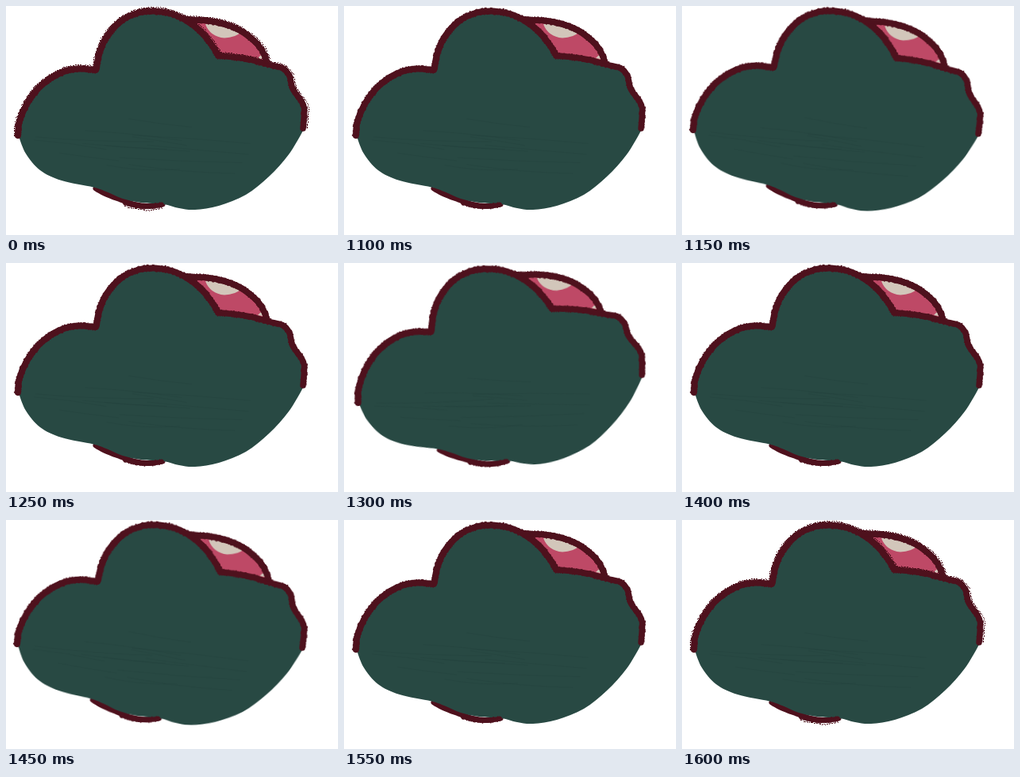
An HTML page for the animation above (2400 ms loop, 418 px wide and 290 px high).

```html
<!DOCTYPE html>
<html lang="en">
<head>
<meta charset="utf-8">
<title>Wobbling cloud</title>
<style>
  html, body { margin: 0; width: 100%; height: 100%; overflow: hidden; background: #fff; }
  svg { display: block; width: 418px; height: 290px; }
  #cloud { transform-origin: 195px 133px; }
  .ink { fill: none; stroke: #4e111d; stroke-linecap: round; stroke-linejoin: round; }
  .grain { fill: #4e111d; }
  .streak { fill: none; stroke: #223f39; stroke-width: 1; opacity: .28; }
</style>
</head>
<body>
<svg viewBox="0 0 418 290">
  <g id="cloud">
    <path fill="#be4966" d="M238 20L262 20Q292 24 309 41Q321 54 327 69L300 66L266 64Q257 44 238 23Z"/>
    <path fill="#d2c6ba" d="M251 23Q257 39 275 40.500Q289 40 296 33L280 22ZM323 60L317 66L327 68Z"/>
    <g id="art"></g>
    <path id="specks" class="grain"/>
  </g>
</svg>
<script>
const LOOP = 2400;
const cloud = document.getElementById('cloud');
const art = document.getElementById('art');
const specks = document.getElementById('specks');

let seed = 11;
const rnd = () => (seed = (seed * 16807) % 2147483647) / 2147483647;

// Catmull-Rom spline through a flat "x y x y" list
function spline(list) {
  const n = list.split(' ').map(Number), p = [];
  for (let i = 0; i < n.length; i += 2) p.push([n[i], n[i + 1]]);
  let d = `M${p[0]}`;
  for (let i = 0; i < p.length - 1; i++) {
    const a = p[i - 1] || p[i], b = p[i], c = p[i + 1], e = p[i + 2] || c;
    const h1 = b.map((v, k) => v + (c[k] - a[k]) / 6);
    const h2 = c.map((v, k) => v - (e[k] - b[k]) / 6);
    d += `C${h1} ${h2} ${c}`;
  }
  return d;
}

function add(d, attrs) {
  const el = document.createElementNS('http://www.w3.org/2000/svg', 'path');
  el.setAttribute('d', d);
  for (const k in attrs) el.setAttribute(k, attrs[k]);
  art.append(el);
  return el;
}

const LEFT = '15 164 17 146 28 121 45 100 68 85 90 79.500 113 81';
const TOP = '114 79 117 62 126 40 145 19 167 8.500 188 6.500 209 10 228 19 245 32 258 48 267 62';
const RIGHT = '267 63 285 64.500 308 68 330 74 349 79 357 89 361 105 371 119 375.500 130 374 155';
const CAP = '226 17 245 18 265 20.500 289 28 309 41 321 54 328 69';
const BASE = '113 231 126 238 144 245 162 251.500 180 253.500 197 251';
const BELLY = '374 158 356 188 331 216 302 239 268 253 238 258 218 256 198 251 170 249 147 244 126 235 110 229.500 70 221 43 208 25 187 16 165';

const join = (...parts) => parts.map(spline)
  .map((d, i) => i ? d.replace('M', 'L').replace('C', ' C') : d).join('');

add(spline(CAP), { class: 'ink', 'stroke-width': 7.5 });
add(spline(BASE), { class: 'ink', 'stroke-width': 7 });
add(join(LEFT, TOP, RIGHT, BELLY) + 'Z', { fill: '#284943' });

for (let i = 0; i < 13; i++) {
  const x = 35 + rnd() * 150, y = 142 + rnd() * 62, w = 60 + rnd() * 100;
  add(`M${x} ${y}q${w / 2} ${3 + rnd() * 7} ${w} ${5 + rnd() * 8}`, { class: 'streak' });
}

// Brush line with a bumpy rim; loose grain goes on the outer side only
let bumps = '', dust = '';
function brush(list, width, out) {
  const line = add(spline(list), { class: 'ink', 'stroke-width': width });
  const len = line.getTotalLength();
  for (let s = 0; s < len; s += 1.4) {
    const p = line.getPointAtLength(s), q = line.getPointAtLength(Math.min(len, s + 1));
    const o = line.getPointAtLength(Math.max(0, s - 1));
    const t = Math.atan2(q.y - o.y, q.x - o.x);
    const at = r => [p.x + Math.sin(t) * r, p.y - Math.cos(t) * r];
    const side = rnd() < .5 ? 1 : -1;
    const [bx, by] = at(side * (width / 2 - .4 + rnd() * .5));
    const r = .4 + rnd() * .7;
    bumps += `M${bx - r} ${by}a${r} ${r} 0 1 0 ${2 * r} 0a${r} ${r} 0 1 0 ${-2 * r} 0`;
    const [x, y] = at(out * (width / 2 + .3 + rnd() * 1.4)).map(Math.round);
    dust += `M${x} ${y}h1v1h-1z`;
  }
}

brush(LEFT, 8, 1);
brush(TOP, 8, 1);
brush(RIGHT, 7.5, 1);
brush(CAP, 7.5, 1);
brush('150 249 163 252.500 180 254 196 251.500', 6, -1);
add(bumps, { class: 'grain' });
specks.setAttribute('d', dust);

// [start ms, tilt in degrees]
const POSES = [
  [0, 0], [1150, 2.2], [1250, 0], [1300, -4.2], [1350, -5],
  [1400, 0], [1450, 2.2], [1550, 0], [LOOP, 0]
];
const timing = { duration: LOOP, iterations: Infinity };
const hold = 'steps(1, end)';

const moves = [
  cloud.animate(POSES.map(([ms, deg]) =>
    ({ offset: ms / LOOP, transform: `rotate(${deg}deg)`, easing: hold })), timing),
  specks.animate([[0, 1], [1100, 0], [1600, 1], [LOOP, 1]].map(([ms, opacity]) =>
    ({ offset: ms / LOOP, opacity, easing: hold })), timing)
];
moves.forEach(m => m.startTime = document.timeline.currentTime);
</script>
</body>
</html>
```
